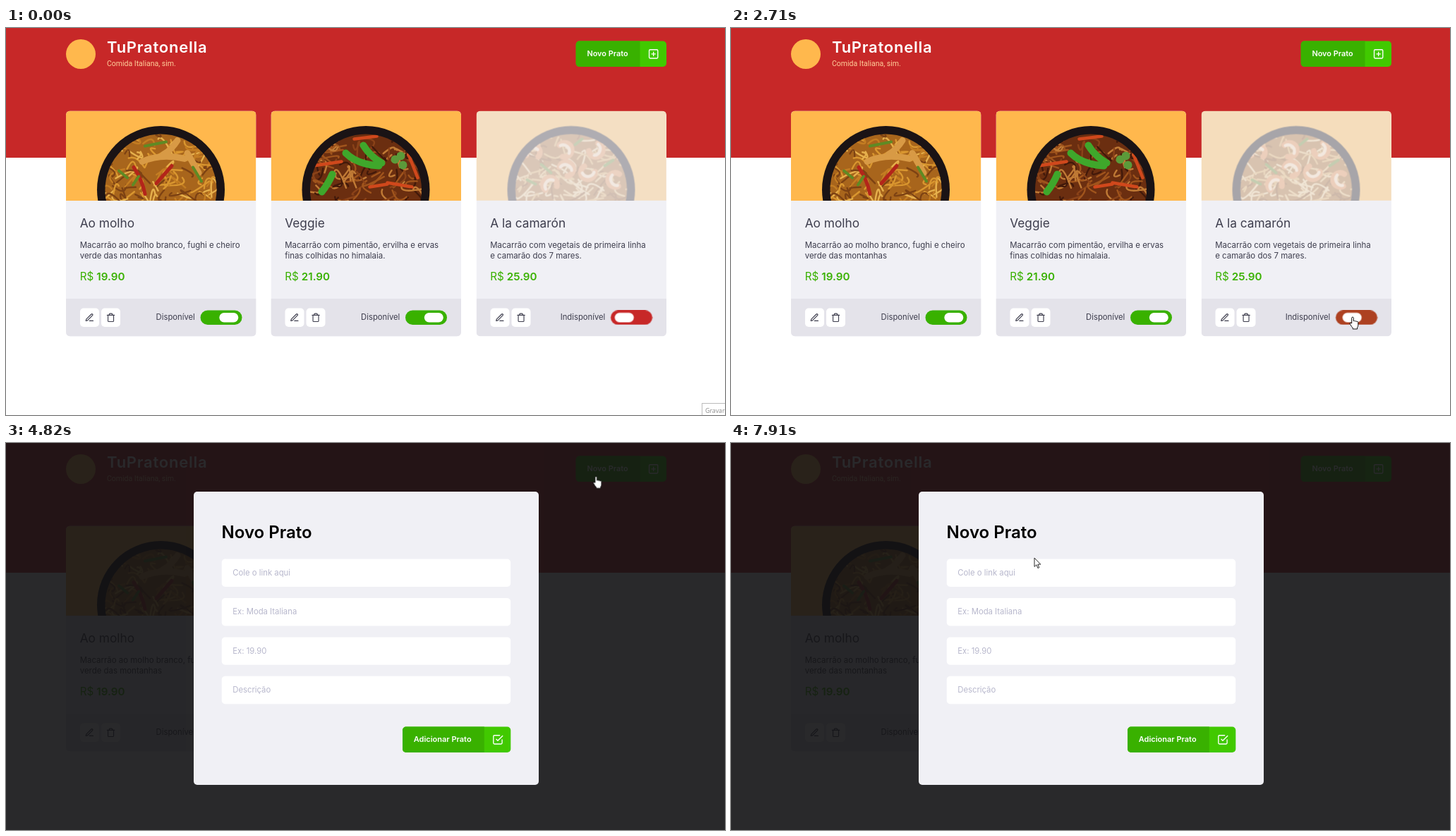
These frames come from a looping animation (1019x549 px, 8000 ms). An HTML page:

```html
<!DOCTYPE html>
<html lang="pt">
<head>
<meta charset="utf-8">
<title>Novo Prato</title>
<style>
html, body { margin: 0; width: 100%; height: 100%; overflow: hidden; background: #fff; }
svg { display: block; }
text { font-family: Inter, sans-serif; white-space: pre; }
.line { fill: none; stroke: #3d3d4d; stroke-width: 2; stroke-linecap: round; stroke-linejoin: round; }
.white { stroke: #fff; }
.track { fill: #39b100; }
.off { display: none; }

.tip, .modal, .click, .cursor, .hand, .arrow, .live .on, .live .off { animation: 8s step-end infinite; }
.live .off { display: inline; }
.tip { animation-name: tip; }
.modal { animation-name: modal; }
.click { animation-name: click; }
.hand { animation-name: hand; }
.arrow { animation-name: arrow; }
.cursor { animation-name: cursor; }
.path { animation: path 8s linear infinite; }
.live { animation: remove 8s linear infinite; }
.live .on { animation-name: on; }
.live .off { animation-name: off; }
.live .knob { animation: knob 8s linear infinite; }
.live .track { animation: track 8s linear infinite; }
.live .photo { animation: photo 8s linear infinite; }

@keyframes tip { 0% { opacity: 1 } .875%, 100% { opacity: 0 } }
@keyframes modal { 0% { opacity: 0 } 60.25%, 100% { opacity: 1 } }
@keyframes click { 0% { opacity: 0 } 58.5% { opacity: .5 } 60.25%, 100% { opacity: 0 } }
@keyframes on { 0% { opacity: 0 } 15.25% { opacity: 1 } 29.5%, 100% { opacity: 0 } }
@keyframes off { 0% { opacity: 1 } 15.25% { opacity: 0 } 29.5%, 100% { opacity: 1 } }
@keyframes cursor { 0% { opacity: 0 } .875% { opacity: 1 } 66.3% { opacity: 0 } 96.375%, 100% { opacity: 1 } }
@keyframes hand {
  0%, 36.6%, 51%, 61.1%, 100% { opacity: 0 }
  10%, 38.6%, 57.6% { opacity: 1 }
}
@keyframes arrow {
  0%, 36.6%, 51%, 61.1%, 100% { opacity: 1 }
  10%, 38.6%, 57.6% { opacity: 0 }
}
@keyframes knob {
  0%, 15.9% { transform: translateX(0); animation-timing-function: ease-in-out }
  21.5%, 29.5% { transform: translateX(21px); animation-timing-function: ease-in-out }
  35.75%, 100% { transform: translateX(0) }
}
@keyframes track {
  0%, 15.9% { fill: #c72828; animation-timing-function: ease-in-out }
  21.5%, 29.5% { fill: #39b100; animation-timing-function: ease-in-out }
  35.75%, 100% { fill: #c72828 }
}
@keyframes photo {
  0%, 15.9% { opacity: .3 }
  21.5%, 29.5% { opacity: 1; animation-timing-function: ease }
  35.75%, 100% { opacity: .3 }
}
@keyframes remove { 0%, 46.1% { opacity: 1 } 48.2%, 100% { opacity: 0 } }
@keyframes path {
  0%, .875% { transform: translate(1005px, 538px); animation-timing-function: ease-out }
  10.1% { transform: translate(882px, 416px) }
  12.75%, 36.25% { transform: translate(881px, 410px); animation-timing-function: ease-out }
  38.9% { transform: translate(740px, 404px) }
  39.75%, 42% { transform: translate(736px, 408px) }
  44%, 50% { transform: translate(733px, 411px); animation-timing-function: ease-in-out }
  58.1%, 60.25% { transform: translate(838px, 47px) }
  65.5% { transform: translate(93px, 157px) }
  66.3%, 96.375% { transform: translate(191px, 197px); animation-timing-function: ease-out }
  98.9%, 100% { transform: translate(430px, 163px) }
}
</style>
</head>
<body>
<svg id="stage" width="1019" height="549" viewBox="0 0 1019 549">
  <defs>
    <clipPath id="card"><rect width="269.5" height="320" rx="6"/></clipPath>
    <clipPath id="food"><circle cx="134.5" cy="112" r="79"/></clipPath>
    <g id="pen" class="line"><path d="M12 20h9M16.5 3.5a2.12 2.12 0 0 1 3 3L7 19l-4 1 1-4z"/></g>
    <g id="bin" class="line"><path d="M3 6h18M19 6v14a2 2 0 0 1-2 2H7a2 2 0 0 1-2-2V6m3 0V4a2 2 0 0 1 2-2h4a2 2 0 0 1 2 2v2"/></g>
  </defs>
  <rect width="1019" height="184" fill="#c72828"/>
  <circle cx="106" cy="37" r="21" fill="#ffb84d"/>
  <text x="143" y="35" font-size="22" font-weight="600" letter-spacing=".75" fill="#fff">TuPratonella</text>
  <text x="143" y="53.5" font-size="10.5" fill="#ffcf9a" style="font-family:Roboto,sans-serif">Comida Italiana, sim.</text>
  <g id="add"></g>
  <g id="cards"></g>
  <g class="tip">
    <rect x="986.5" y="532.5" width="40" height="24" fill="#fff" stroke="#bbb"/>
    <text x="991" y="546" font-size="8.8" fill="#8a8a8a" style="font-family:'Open Sans',sans-serif">Gravar</text>
  </g>
  <circle class="click" cx="837" cy="47" r="9" fill="#ff0"/>
  <g class="modal" id="modal"></g>
  <g class="cursor"><g class="path" fill="#fff" stroke="#111" stroke-linejoin="round">
    <path class="arrow" d="M0 0V12.4l2.9-2.6 2 4.7 1.9-.8-2-4.6h4z" stroke-width=".9"/>
    <path class="hand" d="M-1.3 9V1.4a1.3 1.3 0 0 1 2.6 0V5.7q1.2-.9 2.3.3 1.2-.7 2.2.4 1.4-.5 2 .9v4.2q0 2-1.2 3.4V17H.2v-1.6q-1.7-1.5-3.3-4.6-1-1.6-1-2 .9-1.2 2.8.2z"/>
  </g></g>
</svg>
<script>
const byId = id => document.getElementById(id);
const text = (x, y, size, str, attrs = '') =>
  `<text x="${x}" y="${y}" font-size="${size}" ${attrs}>${str}</text>`;
const rect = (x, y, w, h, r, attrs) =>
  `<rect x="${x}" y="${y}" width="${w}" height="${h}" rx="${r}" ${attrs}/>`;
const stroke = (d, color, w) =>
  `<path d="${d}" fill="none" stroke="${color}" stroke-width="${w}" stroke-linecap="round"/>`;

function button(x, y, w, label, size, icon) {
  const cut = w - 37.5;
  return `<g transform="translate(${x} ${y})">` +
    rect(0, 0, w, 36.5, 5, 'fill="#41c900"') +
    `<path d="M5 0H${cut}V36.5H5a5 5 0 0 1-5-5V5a5 5 0 0 1 5-5z" fill="#39b100"/>` +
    text(15.7, 21.7, size, label, 'font-weight="600" fill="#fff"') +
    `<path class="line white" transform="translate(${cut + 11} 10.2) scale(.68)" d="${icon}"/></g>`;
}

function noodles(seed, colors) {
  const rnd = () => (seed = (seed * 16807) % 2147483647) / 2147483647;
  const span = n => ((rnd() - .5) * n).toFixed(1);
  let out = '';
  for (let i = 0; i < 110; i++) {
    const x = 134 + +span(160), y = 84 + +span(104);
    out += stroke(`M${x} ${y}q${span(40)} ${span(40)} ${span(56)} ${span(44)}`, colors[i % colors.length], 2.4);
  }
  return out;
}

const shrimp = [[80, 58], [126, 55], [170, 56], [158, 88], [196, 98], [104, 104], [128, 82]]
  .map(([x, y], i) => `<g transform="translate(${x} ${y}) rotate(${i * 67})">` +
    stroke('M-9 5A10 10 0 1 1 8 7', '#e58f4e', 8) + stroke('M-8 4A9 9 0 0 1 7 -3', '#f8d9b4', 4.5) + '</g>').join('');

const dishes = [
  { x: 85, name: 'Ao molho', price: '19.90', base: '#a8651c',
    lines: ['Macarrão ao molho branco, fughi e cheiro', 'verde das montanhas'],
    tones: ['#d9962f', '#e6b04c', '#7d4213', '#c47d22'],
    top: stroke('M108 72Q135 60 168 68M158 42Q150 55 138 62M172 60L188 88', '#d89a45', 9) +
      stroke('M96 80Q108 98 112 118M128 103L150 78', '#b3251a', 5) +
      stroke('M112 50L142 44M180 80l12 20M95 105l8-12M75 85l12 10', '#5f8a24', 4) },
  { x: 375.5, name: 'Veggie', price: '21.90', base: '#6b2e10',
    lines: ['Macarrão com pimentão, ervilha e ervas', 'finas colhidas no himalaia.'],
    tones: ['#a0541c', '#c07a35', '#42190a', '#8a4218'],
    top: stroke('M60 78L100 72M195 62L208 95M165 102L200 108M140 108L165 104M118 40L150 36', '#d0481c', 4.5) +
      stroke('M106 60Q122 76 153 78M131 49Q140 64 157 74M87 90Q81 104 72 115', '#3fa72b', 10) +
      '<g fill="#5b9a3a"><circle cx="176" cy="69" r="6"/><circle cx="187" cy="77" r="6"/><circle cx="184" cy="64" r="6"/></g>' },
  { x: 666.5, name: 'A la camarón', price: '25.90', base: '#a86a2a', live: true,
    lines: ['Macarrão com vegetais de primeira linha', 'e camarão dos 7 mares.'],
    tones: ['#f0d098', '#dfab5e', '#8a4f1c', '#e8bd78'],
    top: stroke('M92 76l14 12M150 40l-10 8M182 78l12-8M72 98l12 6', '#6f8a2e', 4) + shrimp },
];

function photo(d, i) {
  return `<svg class="photo" width="269.5" height="127.5">` +
    rect(0, 0, 269.5, 127.5, 0, 'fill="#ffb84d"') +
    `<circle cx="134.5" cy="112" r="90.5" fill="#1a1315"/>` +
    `<g clip-path="url(#food)">` + rect(50, 30, 170, 100, 0, `fill="${d.base}"`) +
    noodles(41 + i * 977, d.tones) + d.top + '</g></svg>';
}

function card(d, i) {
  const dark = 'fill="#3d3d4d"';
  const label = (cls, str) => text(182.8, 296.5, 11.25, str, `class="${cls}" text-anchor="end" ${dark}`);
  return `<g class="${d.live ? 'live' : ''}"><g transform="translate(${d.x} 117.5)" clip-path="url(#card)">` +
    rect(0, 0, 269.5, 320, 0, 'fill="#f0f0f5"') + photo(d, i) +
    rect(0, 266.5, 269.5, 53.5, 0, 'fill="#e4e3ea"') +
    text(19.7, 165.7, 17.3, d.name, dark) +
    d.lines.map((s, n) => text(19.7, 194 + n * 15.5, 11.45, s, dark)).join('') +
    text(19.7, 240.3, 15.2, 'R$', 'fill="#39b100"') +
    text(43.3, 240.3, 15.2, d.price, 'fill="#39b100" font-weight="600"') +
    rect(20, 280, 27, 26.5, 5, 'fill="#fff"') + rect(50, 280, 27, 26.5, 5, 'fill="#fff"') +
    '<use href="#pen" transform="translate(26.5 286.5) scale(.57)"/>' +
    '<use href="#bin" transform="translate(56.7 286.5) scale(.57)"/>' +
    label('on', 'Disponível') + (d.live ? label('off', 'Indisponível') : '') +
    rect(190.5, 283, 59, 20.5, 10.25, 'class="track"') +
    rect(d.live ? 196.3 : 217.3, 286.5, 27, 13.5, 6.75, 'class="knob" fill="#fff"') + '</g></g>';
}

byId('add').innerHTML = button(807.7, 18.5, 128.3, 'Novo Prato', 10.9,
  'M5 3h14a2 2 0 0 1 2 2v14a2 2 0 0 1-2 2H5a2 2 0 0 1-2-2V5a2 2 0 0 1 2-2zM12 8v8M8 12h8');
byId('cards').innerHTML = dishes.map(card).join('');
byId('modal').innerHTML =
  rect(0, 0, 1019, 549, 0, 'fill="#121214" fill-opacity=".9"') +
  rect(266, 69, 489, 416, 5, 'fill="#f0f0f5"') +
  text(305.5, 134.5, 24, 'Novo Prato', 'font-weight="600"') +
  ['Cole o link aqui', 'Ex: Moda Italiana', 'Ex: 19.90', 'Descrição'].map((s, i) =>
    rect(305.7, 164.6 + i * 55.4, 409.5, 39.4, 5, 'fill="#fff"') +
    text(321.3, 188 + i * 55.4, 11.3, s, 'fill="#b7b7cc"')).join('') +
  button(562, 402.5, 153.3, 'Adicionar Prato', 11,
    'M9 11l3 3L22 4M21 12v7a2 2 0 0 1-2 2H5a2 2 0 0 1-2-2V5a2 2 0 0 1 2-2h11');
</script>
</body>
</html>
```
